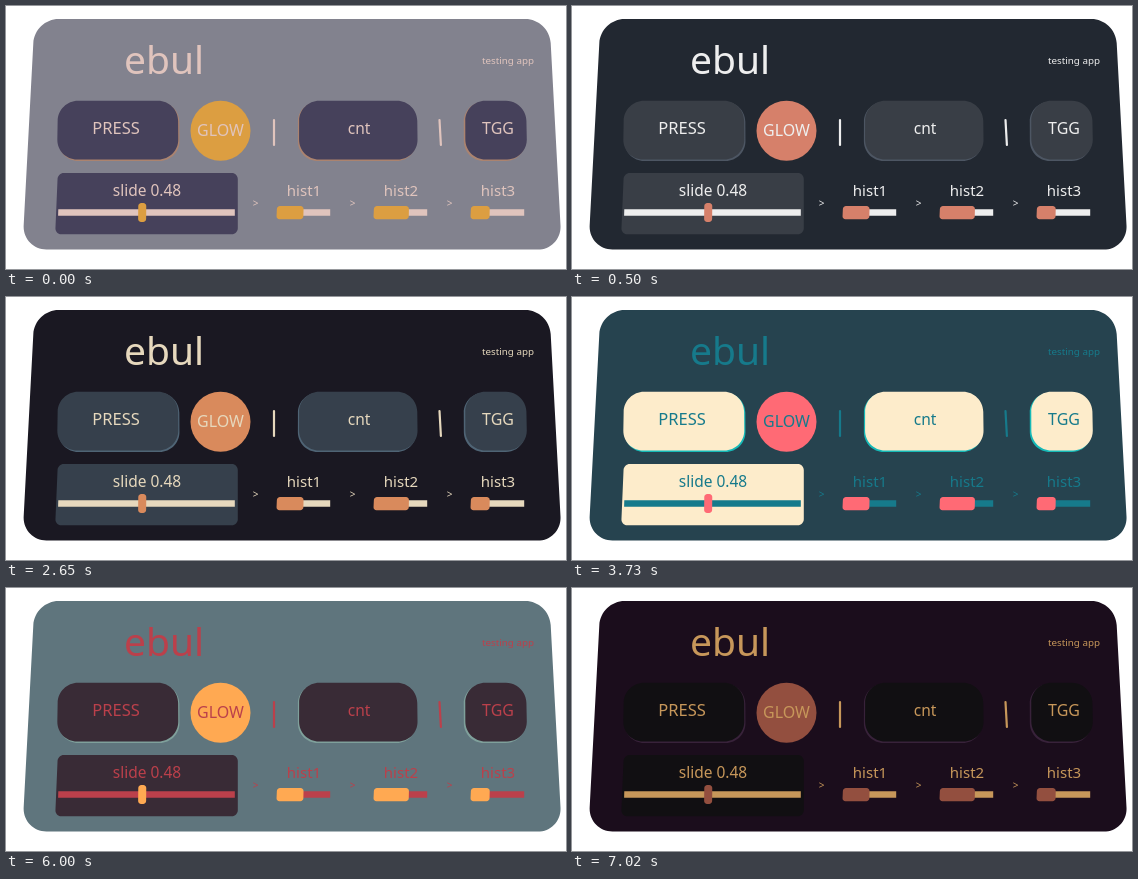
Write an HTML page that moves like this. It is 560 px wide and 263 px high and loops after 8 s.

```html
<!DOCTYPE html>
<html lang="en">
<head>
<meta charset="utf-8">
<title>Panel themes</title>
<style>
  html, body { margin: 0; width: 100%; height: 100%; overflow: hidden; background: #fff; }
  svg { display: block; width: 100%; height: 100%; }
  text { font-family: "Noto Sans", "Open Sans", sans-serif; text-anchor: middle; }
  .bg { fill: var(--bg); }
  .face { fill: var(--face); }
  .edge { fill: var(--edge); }
  .ink { fill: var(--ink); }
  .accent { fill: var(--accent); }
  .bar { stroke: var(--ink); stroke-width: 2.2; stroke-linecap: round; }
</style>
</head>
<body>
<svg id="stage" viewBox="0 0 560 263"></svg>
<script>
const LOOP = 8000;
const stage = document.getElementById('stage');

// Each theme holds from its start time until the next one.
const themes = [
  { at: 0,    bg: '#82828e', face: '#46415b', edge: '#ab836f', ink: '#e0c4bd', accent: '#dc9e41' },
  { at: 500,  bg: '#222831', face: '#393e46', edge: '#4d5663', ink: '#eeeeee', accent: '#d6806a' },
  { at: 1450, bg: '#1a1822', face: '#3e344a', edge: '#5c6287', ink: '#f2eee0', accent: '#d87662' },
  { at: 2650, bg: '#1a1822', face: '#36404c', edge: '#4f6475', ink: '#e6d8bd', accent: '#d98a5c' },
  { at: 3730, bg: '#26434f', face: '#fdeccb', edge: '#15b9b7', ink: '#167a8b', accent: '#ff6a75' },
  { at: 4920, bg: '#16191d', face: '#443b43', edge: '#1e2126', ink: '#f0f3d8', accent: '#e9825a' },
  { at: 6000, bg: '#5f757d', face: '#392b36', edge: '#7fa09b', ink: '#bb404b', accent: '#ffa952' },
  { at: 7020, bg: '#1b0d1c', face: '#110f12', edge: '#38223a', ink: '#c7975a', accent: '#934f3f' }
];

function add(tag, attrs, content = '') {
  const el = document.createElementNS('http://www.w3.org/2000/svg', tag);
  for (const key in attrs) el.setAttribute(key, attrs[key]);
  el.textContent = content;
  stage.append(el);
}

// Rounded trapezoid: the bottom corners move by dl and dr.
function slab(cls, x0, x1, y0, y1, r, dl = 0, dr = 0) {
  const h = y1 - y0, k = r * 0.45;
  const left = y => x0 + dl * (y - y0) / h;
  const right = y => x1 + dr * (y - y0) / h;
  const d = `M${x0 + r} ${y0}H${x1 - r}
    C${x1 - k} ${y0} ${right(y0 + k)} ${y0 + k} ${right(y0 + r)} ${y0 + r}
    L${right(y1 - r)} ${y1 - r}
    C${right(y1 - k)} ${y1 - k} ${x1 + dr - k} ${y1} ${x1 + dr - r} ${y1}
    H${x0 + dl + r}
    C${x0 + dl + k} ${y1} ${left(y1 - k)} ${y1 - k} ${left(y1 - r)} ${y1 - r}
    L${left(y0 + r)} ${y0 + r}
    C${left(y0 + k)} ${y0 + k} ${x0 + k} ${y0} ${x0 + r} ${y0}Z`;
  add('path', { class: cls, d });
}

function label(str, x, y, size) {
  add('text', { class: 'ink', x, y, 'font-size': size }, str);
}

// The lower layer shows as a thin rim, shifted by the viewing angle.
function button(str, x0, x1, rim, tx, size, dl, dr) {
  slab('edge', x0 + rim, x1 + rim, 95.8, 155, 20, dl, dr);
  slab('face', x0, x1, 94.8, 153.4, 20, dl, dr);
  label(str, tx, 128.4, size);
}

function divider(x0, x1) {
  add('line', { class: 'bar', x1: x0, y1: 114, x2: x1, y2: 139 });
}

function meter(str, x, fill) {
  label('>', x - 21.3, 200.8, 10);
  label(str, x + 27, 190, 15);
  slab('ink', x, x + 53.2, 203.3, 209.8, 0);
  slab('accent', x, x + fill, 200, 213.2, 3, -0.6, -0.3);
}

slab('bg', 28.6, 543.4, 13, 243.6, 24, -12.2, 12.4);
label('ebul', 158, 68, 39);
label('testing app', 502, 58.2, 9.8);

button('PRESS', 52, 172, 1.2, 110, 16.5, -1, 0.4);
add('circle', { class: 'accent', cx: 214.5, cy: 124.8, r: 30 });
label('GLOW', 214.5, 130, 16);
divider(268, 268);
button('cnt', 293.2, 411, -1.2, 353, 15.5, -0.2, 0.8);
divider(433.5, 434.9);
button('TGG', 459.2, 520, -1.5, 492, 16, 0.2, 1.2);

slab('face', 51.8, 231.8, 167, 228.2, 6, -2.6, 0);
label('slide 0.48', 141, 190, 15.5);
slab('ink', 52.3, 228.8, 203.3, 209.8, 0, -0.2);
slab('accent', 132.3, 140.3, 197, 216, 3, -0.2, -0.2);

meter('hist1', 271, 26.6);
meter('hist2', 368, 35);
meter('hist3', 465, 18.8);

let current;
function draw(ms) {
  const theme = themes.findLast(t => t.at <= ms);
  if (theme === current) return;
  current = theme;
  for (const part of ['bg', 'face', 'edge', 'ink', 'accent']) {
    stage.style.setProperty('--' + part, theme[part]);
  }
}

const start = performance.now();
function tick() {
  draw((performance.now() - start) % LOOP);
  requestAnimationFrame(tick);
}
tick();
</script>
</body>
</html>
```
